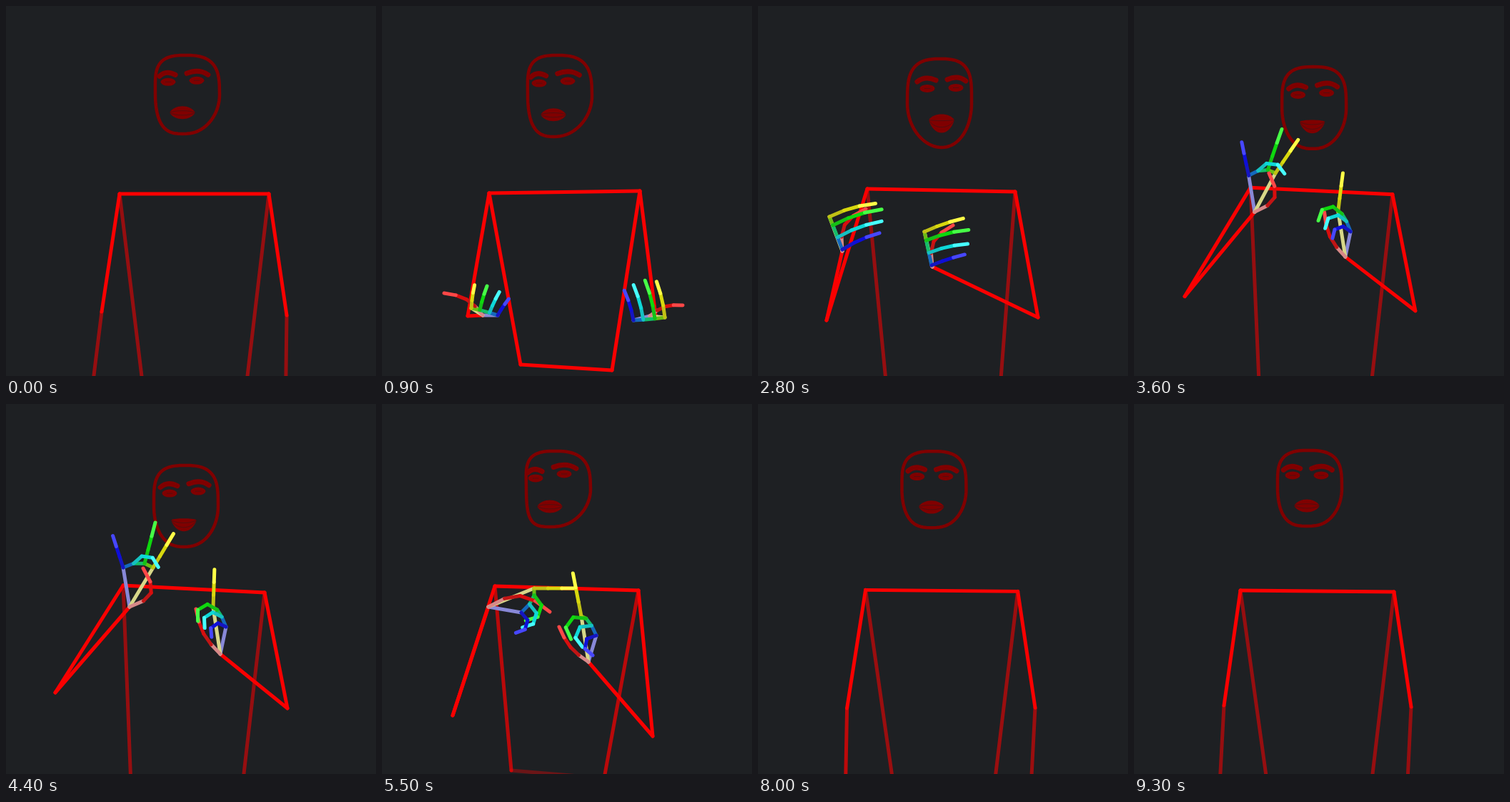
These frames come from a looping animation (518x518 px, 9.4 s). An HTML page with a canvas:

```html
<!DOCTYPE html>
<html lang="en">
<head>
<meta charset="utf-8">
<title>Pose skeleton</title>
<style>
  html, body { margin: 0; width: 100%; height: 100%; overflow: hidden; background: #1e2023; }
  canvas { display: block; width: 518px; height: 518px; }
</style>
</head>
<body>
<canvas id="stage" width="518" height="518"></canvas>
<script>
const ctx = document.getElementById('stage').getContext('2d');
const LOOP = 9400, STEP = 100, SIZE = 518;
const BG = '#1e2023', FACE = '#800000', CREASE = 'rgba(30,32,35,.45)';

// Hand, relative to the wrist: index and little knuckle; thumb tip and bow;
// index and little direction in degrees; finger length; bend per joint
const hand = (knuckles, thumb, fan, length, folds) => [knuckles, thumb, fan, length, folds];

// hold: span in which the pose rests
// head: centre x, y, half height, yaw, tilt, half mouth height, lift of its corners
// shoulders, hips; arms: elbow, wrist, elbow, wrist; seen: how well the hips are seen
const poses = [
  {
    hold: [0, 300], head: [254, 124, 55, -7, -2, 9, 0],
    shoulders: [159,263, 368,263], hips: [192,535, 336,535], seen: 0,
    arms: [134,428, 114,590, 393,433, 391,590]
  },
  {
    hold: [900, 1900], head: [249, 126, 57, -9, -3, 9, 0],
    shoulders: [150,262, 361,259], hips: [194,502, 322,510], seen: 1,
    arms: [120,434, 141,433, 383,433, 375,434],
    left: hand([-16,-10, 21,0], [-54,-31, 8], [-88,-62], 34, [3, 3, 3, 3]),
    right: hand([21,2, -23,6], [46,-15, -6], [-93,-97], 54, [-5, -5, -5, -5])
  },
  {
    hold: [2500, 3100], head: [254, 136, 62, 3, -1, 13, -5],
    shoulders: [153,256, 360,260], hips: [180,535, 339,535], seen: 0,
    arms: [96,440, 118,343, 392,436, 244,365],
    left: hand([-18,-48, 0,-2], [33,-59, -15], [-30,-36], 71, [7, 7, 7, 6]),
    right: hand([-11,-49, -1,-2], [29,-58, -14], [-27,-24], 60, [4, 6, 6, 3])
  },
  {
    hold: [3700, 4700], head: [252, 143, 57, -3, -3, 9, -7],
    shoulders: [164,254, 362,264], hips: [175,535, 331,535], seen: 0,
    arms: [69,404, 173,284, 394,426, 300,350],
    left: hand([33,-55, -9,-55], [19,-54, 22], [-59,-108], 57, [0, 0, 50, 0]),
    right: hand([-10,-65, 8,-38], [-34,-63, -7], [-88,-95], 55, [0, -60, -60, -60])
  },
  {
    hold: [5050, 5800], head: [247, 119, 53, -12, -6, 9, 0],
    shoulders: [158,255, 359,261], hips: [181,513, 311,524], seen: .35,
    arms: [99,436, 149,284, 379,465, 289,361],
    left: hand([64,-26, 46,8], [86,7, -19], [0,-5], 60, [0, 55, 55, 55]),
    right: hand([-10,-64, 11,-37], [-41,-49, -6], [-101,-140], 63, [0, -60, -60, -60])
  },
  {
    hold: [6300, 7700], head: [249, 129, 56, -2, -1, 10, -4],
    shoulders: [159,257, 362,259], hips: [201,507, 327,508], seen: .2,
    arms: [117,447, 151,308, 388,432, 378,550],
    left: hand([-4,-57, 35,-42], [-60,-52, 2], [-101,-60], 59, [3, 3, 3, 3])
  },
  {
    hold: [8100, 9300], head: [246, 118, 53, -4, 0, 9, 0],
    shoulders: [149,261, 364,263], hips: [187,535, 332,535], seen: 0,
    arms: [126,422, 117,590, 388,424, 380,590]
  }
];

const mix = (a, b, k) => Array.isArray(a) ? a.map((v, i) => mix(v, b[i], k)) : a + (b - a) * k;
const pt = (list, i) => [list[2 * i], list[2 * i + 1]];
const clamp = (v, lo, hi) => Math.min(hi, Math.max(lo, v));
const power = (v, p) => Math.sign(v) * Math.abs(v) ** p;

function stroke(points, color, width = 5) {
  ctx.strokeStyle = color;
  ctx.lineWidth = width;
  ctx.beginPath();
  points.forEach(p => ctx.lineTo(...p));
  ctx.stroke();
}

const limb = (a, b, alpha = 1) => alpha > .01 && stroke([a, b], `rgba(250,0,0,${alpha})`);

// A superellipse with a flat crown; a longer face gets a slimmer jaw
function drawOval(x, y, h, yaw) {
  const jaw = .75 + (h - 54) * .03, outline = [];
  for (let i = 0; i <= 80; i++) {
    const a = i / 40 * Math.PI, low = Math.sin(a) > 0;
    const px = power(Math.cos(a), low ? jaw : .72);
    const py = power(Math.sin(a), low ? 1 : .55);
    outline.push([x + 45 * px + yaw * py * py * (low ? 1 : .4), y + h * py]);
  }
  stroke(outline, FACE, 4.5);
}

function drawBrow(x, y, w, side) {
  ctx.strokeStyle = FACE;
  ctx.lineWidth = 7;
  ctx.beginPath();
  ctx.moveTo(x + side * (w - 3), y + 3);
  ctx.quadraticCurveTo(x + side * 2, y - 6, x - side * (w - 3), y + 1);
  ctx.stroke();
}

function drawEye(x, y) {
  ctx.fillStyle = FACE;
  ctx.beginPath();
  ctx.ellipse(x, y, 10.5, 5.5, 0, 0, 7);
  ctx.fill();
  stroke([[x - 4, y], [x + 4, y]], CREASE, 1);
}

function drawMouth(x, y, h, lift) {
  const w = 18, top = y + lift;
  const lip = (bend, dir = 1) => {
    const peak = y + (4 * bend - lift) / 3;
    ctx.bezierCurveTo(x - dir * w * .6, peak, x + dir * w * .6, peak, x + dir * w, top);
  };
  const start = () => { ctx.beginPath(); ctx.moveTo(x - w, top); };
  start();
  lip(-h);
  lip(h, -1);
  ctx.fillStyle = FACE;
  ctx.fill();
  ctx.strokeStyle = CREASE;
  ctx.lineWidth = 1;
  for (const bend of [-.3, .4]) { start(); lip(h * bend); ctx.stroke(); }
}

function drawHead([x, y, h, yaw, tilt, mouth, lift]) {
  drawOval(x, y, h, yaw);
  for (const side of [-1, 1]) {
    const slope = side * tilt / 2;
    drawBrow(x + yaw + side * 21, y - .54 * h + slope, 16 + side * .5 - side * yaw * .2, side);
    drawEye(x + yaw + side * 20, y - .34 * h + slope);
  }
  drawMouth(x + yaw, y + .46 * h, mouth, lift);
}

function drawBody({ shoulders, hips, arms, seen }) {
  limb(pt(hips, 0), pt(hips, 1), seen);
  for (const i of [0, 1]) limb(pt(shoulders, i), pt(hips, i), .55 + .45 * seen);
  for (const i of [0, 1]) {
    const elbow = pt(arms, 2 * i), wrist = pt(arms, 2 * i + 1);
    limb(elbow, wrist, clamp(1 - (wrist[1] - 480) / 240, .55, 1));
    limb(pt(shoulders, i), elbow);
  }
  limb(pt(shoulders, 0), pt(shoulders, 1));
}

const LENGTHS = [.97, 1.04, .95, .82];
const SHADES = ['80%,42%', '88%,45%', '100%,64%'];

function finger(start, aim, length, fold) {
  const joints = [start], step = length * (1 - .003 * Math.abs(fold)) / 3;
  for (let i = 1; i <= 3; i++) {
    const a = (aim + fold * i) * Math.PI / 180, [x, y] = joints[i - 1];
    joints.push([x + step * Math.cos(a), y + step * Math.sin(a)]);
  }
  return joints;
}

function thumb([x, y], [dx, dy, bow]) {
  const reach = Math.hypot(dx, dy);
  return [.25, .5, .75, 1].map(k => {
    const off = bow * Math.sin(k * Math.PI) / reach;
    return [x + dx * k - dy * off, y + dy * k + dx * off];
  });
}

function drawHand(wrist, [knuckles, tip, fan, length, folds]) {
  const fingers = [thumb(wrist, tip)];
  folds.forEach((fold, i) => {
    const k = i / 3, bulge = 1 + .12 * Math.sin(k * Math.PI);
    const knuckle = mix(pt(knuckles, 0), pt(knuckles, 1), k);
    const start = knuckle.map((v, j) => wrist[j] + v * bulge);
    fingers.push(finger(start, mix(fan[0], fan[1], k), length * LENGTHS[i], fold));
  });
  for (const f of [4, 1, 0]) stroke([wrist, fingers[f][0]], `hsl(${f * 60},50%,69%)`);
  for (const f of [1, 2, 3]) {
    stroke([fingers[f][0], fingers[f + 1][0]], `hsl(${f * 60 + 30},80%,41%)`);
  }
  fingers.forEach((joints, f) => SHADES.forEach((shade, i) =>
    stroke([joints[i], joints[i + 1]], `hsl(${f * 60},${shade})`)));
}

function poseAt(t) {
  const next = poses.findIndex((p, i) => i && t < p.hold[1]);
  const b = poses[next < 0 ? poses.length - 1 : next], a = poses[poses.indexOf(b) - 1];
  const linear = clamp((t - a.hold[1]) / (b.hold[0] - a.hold[1]), 0, 1);
  const k = linear * linear * (3 - 2 * linear), pose = {};
  for (const part of ['head', 'shoulders', 'hips', 'arms', 'seen']) pose[part] = mix(a[part], b[part], k);
  for (const side of ['left', 'right']) {
    const from = a[side] || b[side], to = b[side] || a[side];
    pose[side] = from && mix(from, to, k);
  }
  return pose;
}

function draw(t) {
  const pose = poseAt(t);
  ctx.fillStyle = BG;
  ctx.fillRect(0, 0, SIZE, SIZE);
  ctx.lineCap = ctx.lineJoin = 'round';
  drawHead(pose.head);
  drawBody(pose);
  ['left', 'right'].forEach((side, i) => {
    const wrist = pt(pose.arms, 2 * i + 1);
    if (pose[side] && wrist[1] < SIZE) drawHand(wrist, pose[side]);
  });
}

const begin = performance.now();
function tick(now) {
  const t = Math.max(0, now - begin) % LOOP;
  draw(Math.floor(t / STEP) * STEP);
  requestAnimationFrame(tick);
}
draw(0);
requestAnimationFrame(tick);
</script>
</body>
</html>
```
